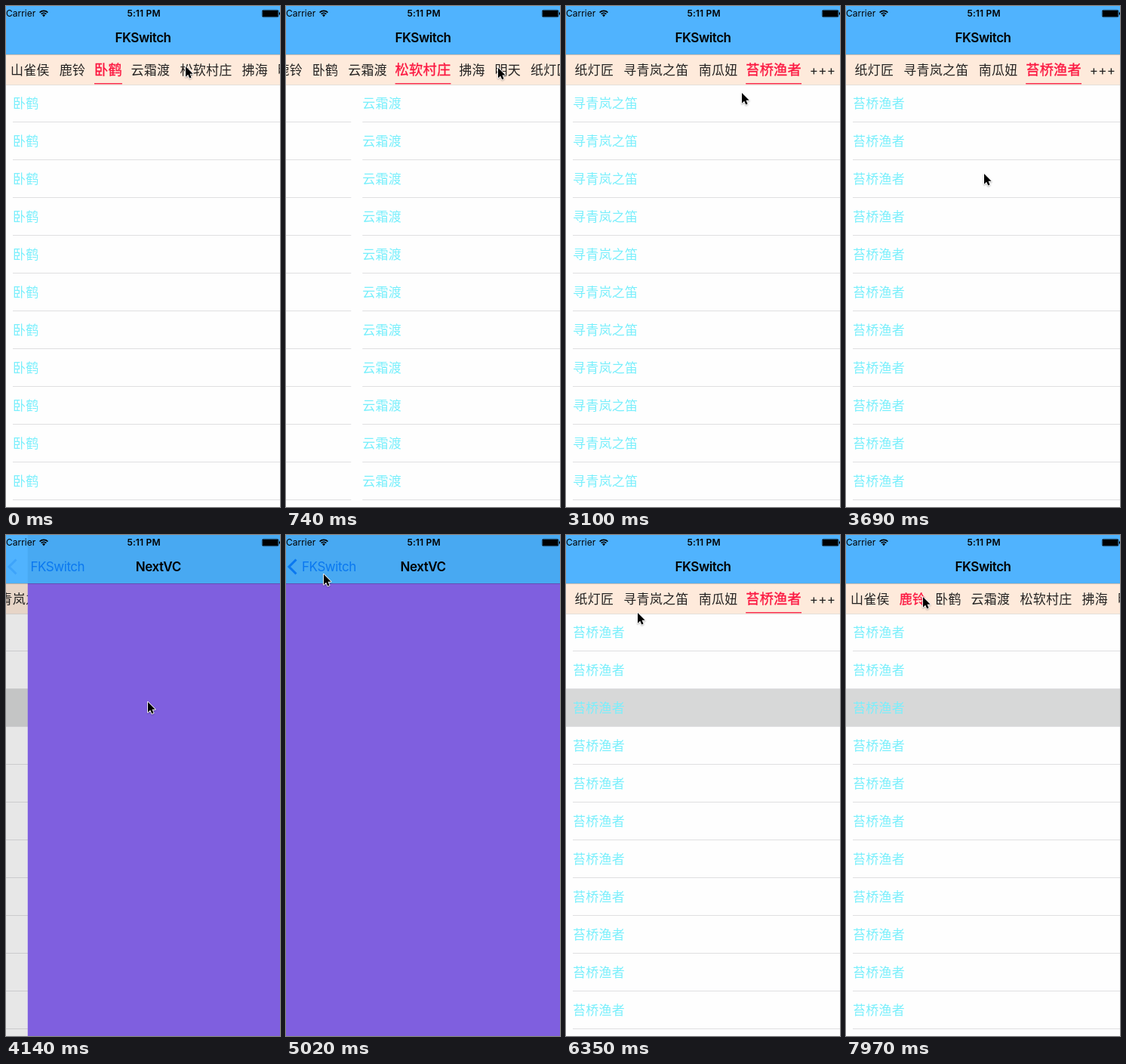
An HTML page with a canvas that plays this animation: 363x663 px, repeating every 8 s.

```html
<!DOCTYPE html>
<html lang="zh-CN">
<head>
<meta charset="utf-8">
<title>FKSwitch</title>
<style>
html, body { margin: 0; width: 100%; height: 100%; overflow: hidden; background: #fff; }
canvas { display: block; width: 363px; height: 663px; }
</style>
</head>
<body>
<canvas id="stage"></canvas>
<script>
const W = 363, H = 663, LOOP = 8000;
const EDGE = -6, PAGE = 375;          // the phone is 375 wide, cropped by 6 on each side
const NAV = 64, LIST = 104, ROW = 50, MAX_SCROLL = 396;
const PUSH = 3892, POP = 5030;
const FAMILY = "Inter, 'Noto Sans CJK SC', 'Noto Sans CJK', sans-serif";

const canvas = document.getElementById('stage');
const ctx = canvas.getContext('2d');
const dpr = window.devicePixelRatio || 1;
canvas.width = W * dpr;
canvas.height = H * dpr;

const clamp = (v, lo = 0, hi = 1) => Math.max(lo, Math.min(hi, v));
const mix = (a, b, k) => a + (b - a) * k;
const smooth = k => k * k * (3 - 2 * k);
const ease = (t, from, to) => smooth(clamp((t - from) / (to - from)));
const spring = s => s <= 0 ? 0 : s > .6 ? 1 : 1 - (1 + 16 * s) * Math.exp(-16 * s);

// Tabs are laid out one after another, each as wide as its text plus a gap.
let right = 6;
const tabs = '山雀侯 鹿铃 卧鹤 云霜渡 松软村庄 拂海 明天 纸灯匠 寻青岚之笛 南瓜妞 苔桥渔者 +++'
  .split(' ').map(name => {
    const n = name === '+++' ? 2 : name.length;
    const width = n * 17.25;
    const tab = { name, width, mid: right + width / 2 };
    right += n * 17.4 + 12.6;
    return tab;
  });
const centred = i => clamp(tabs[i].mid - W / 2, 0, MAX_SCROLL);

const taps = [[-1000, 2], [300, 4], [1000, 6], [1850, 8], [2800, 10], [7960, 1]];
const mousePath = [
  [300, 238, 80], [900, 290, 82], [2050, 290, 82], [2750, 320, 86], [3100, 233, 115],
  [3550, 179, 211], [3690, 183, 222], [4140, 188, 221], [4950, 50, 52],
  [5910, 50, 52], [6350, 95, 103], [6500, 102, 82]
];

// Eases through the tapped tabs; value() gives the goal for each one.
function follow(t, value, delay) {
  return taps.slice(0, 5).reduce(
    (v, [at, i]) => mix(v, value(i), ease(t, at + delay, at + delay + 290)), value(2));
}

// Two drags to the right, the hand going back after each.
const swipes = t => ease(t, 6500, 6850) + ease(t, 7080, 7430);
const returns = t => ease(t, 6850, 7080) + ease(t, 7430, 7750);
const scrollAt = t => follow(t, centred, 0) * (1 - swipes(t) / 2);

function mouseAt(t) {
  const i = mousePath.findIndex(p => p[0] > t);
  const b = mousePath.at(i), a = i > 0 ? mousePath[i - 1] : b;
  const k = a === b ? 0 : ease(t, a[0], b[0]);
  return [mix(a[1], b[1], k) + MAX_SCROLL / 2 * (swipes(t) - returns(t)), mix(a[2], b[2], k)];
}

function box(x, y, w, h, color) {
  ctx.fillStyle = color;
  ctx.fillRect(x, y, w, h);
}

function text(str, x, y, { size = 17, weight = 400, color = '#000', align = 'left', gap = 0, alpha = 1 } = {}) {
  if (alpha <= 0) return;
  ctx.globalAlpha = alpha;
  ctx.font = `${weight} ${size}px ${FAMILY}`;
  ctx.letterSpacing = gap + 'px';
  ctx.textAlign = align;
  ctx.fillStyle = color;
  ctx.fillText(str, x, y);
  ctx.globalAlpha = 1;
}

function drawList(name, x, picked) {
  for (let i = 0; i < 12; i++) {
    const y = LIST + ROW * i;
    const inset = picked && (i === 1 || i === 2) ? EDGE : 9;
    if (picked && i === 2) box(x + EDGE, y, PAGE, ROW - 1, '#d7d8d8');
    box(x + inset, y + ROW - 1, PAGE + EDGE - inset, 1, '#dfdfe1');
    text(name, x + 9, y + 31.3, { color: '#78effc', gap: .25 });
  }
}

function drawPages(t, dx) {
  const pos = follow(t, i => i, 320);
  for (let k = Math.floor(pos); k <= Math.ceil(pos); k++) {
    drawList(tabs[k].name, dx + (k - pos) * PAGE, t >= PUSH);
  }
}

function drawTabs(t, dx) {
  box(dx + EDGE, NAV, PAGE, LIST - NAV, '#feeadb');
  box(dx + EDGE, LIST, PAGE, 1, '#e4dfda');
  const n = taps.findLastIndex(tap => tap[0] <= t);
  const now = taps[n][1], old = taps[Math.max(0, n - 1)][1];
  const k = ease(t, taps[n][0], taps[n][0] + 280);
  const left = dx - scrollAt(t);

  tabs.forEach((tab, i) => {
    const grow = 1 + .07 * (i === now ? k : i === old ? 1 - k : 0);
    const color = i === now ? '#fc1740' : '#242322';
    ctx.save();
    ctx.translate(left + tab.mid, 84.5);
    ctx.scale(grow, grow);
    text(tab.name, -tab.width / 2, 6.4, { color, gap: .25 });
    if (i === now) {
      ctx.strokeStyle = color;
      ctx.lineWidth = .3;
      ctx.strokeText(tab.name, -tab.width / 2, 6.4);
    }
    ctx.restore();
  });

  const w = mix(tabs[old].width, tabs[now].width, k) * 1.07;
  const mid = left + mix(tabs[old].mid, tabs[now].mid, k);
  box(mid - w / 2, 102, w, 1.4, '#f8274b');
}

function drawStatus() {
  text('Carrier', 0, 14.3, { size: 12 });
  text('5:11 PM', 182.5, 14.3, { size: 12, weight: 600, align: 'center', gap: .15 });
  const fan = r => {
    ctx.beginPath();
    ctx.arc(50, 14, r, -Math.PI * .75, -Math.PI * .25);
  };
  ctx.strokeStyle = ctx.fillStyle = '#000';
  ctx.lineWidth = 1.7;
  for (const r of [4.7, 7.6]) {
    fan(r);
    ctx.stroke();
  }
  fan(2.8);
  ctx.lineTo(50, 14.6);
  ctx.fill();

  ctx.lineWidth = .6;
  ctx.beginPath();
  ctx.roundRect(339.3, 5.3, 21.8, 9.4, 2);
  ctx.stroke();
  box(340, 6, 20.4, 8, '#000');
  box(361.8, 8.5, 1.2, 3, '#000');
}

function drawNav(t, p, edge) {
  box(0, 0, W, NAV, '#50b3fe');
  if (p > 0) box(Math.max(0, edge), 0, W, NAV, '#48a9f2');
  const going = t < POP;
  const s = (t - (going ? PUSH : POP)) / 1000;
  const gone = 1 - s / .15;
  const home = going ? gone : (s - .2) / .27;
  const back = going ? s / .2 : gone;
  const next = going ? s / .2 : 1 - s / .31;
  const arrow = going ? (s - .2) / .2 : gone;
  const bold = { weight: 600, align: 'center', gap: -.45 };

  text('FKSwitch', 181.5 - 113 * p, 48, { ...bold, alpha: clamp(home) });
  text('FKSwitch', 144 - 123 * p, 48, { color: '#0a78f0', gap: -.45, alpha: clamp(back) });
  text('NextVC', 181.5 + 218 * (1 - p), 48, { ...bold, alpha: clamp(next) });

  ctx.globalAlpha = clamp(arrow);
  ctx.strokeStyle = '#0a78f0';
  ctx.lineWidth = 3;
  ctx.beginPath();
  ctx.moveTo(13.5, 32.5);
  ctx.lineTo(4, 42);
  ctx.lineTo(13.5, 51.5);
  ctx.stroke();
  ctx.globalAlpha = 1;

  drawStatus();
  box(0, NAV, W, 1, 'rgba(0,0,0,.2)');
}

function drawMouse([x, y]) {
  ctx.save();
  ctx.translate(x, y);
  ctx.scale(.88, .88);
  ctx.beginPath();
  [[0, 0], [0, 15.5], [3.6, 12.2], [6, 17.6], [8.6, 16.5], [6.3, 11.2], [11, 11.2]]
    .forEach(([a, b]) => ctx.lineTo(a, b));
  ctx.closePath();
  ctx.shadowColor = 'rgba(0,0,0,.3)';
  ctx.shadowBlur = 2 * dpr;
  ctx.shadowOffsetY = dpr;
  ctx.lineJoin = 'round';
  ctx.lineWidth = 2;
  ctx.strokeStyle = '#fff';
  ctx.stroke();
  ctx.shadowColor = 'transparent';
  ctx.fillStyle = '#000';
  ctx.fill();
  ctx.restore();
}

function draw(t) {
  ctx.setTransform(dpr, 0, 0, dpr, 0, 0);
  box(0, 0, W, H, '#fefefe');
  const p = spring((t - PUSH) / 1000) - spring((t - POP) / 1000);
  const edge = EDGE + PAGE * (1 - p);
  const dx = -.3 * PAGE * p;
  drawPages(t, dx);
  drawTabs(t, dx);
  if (p > 0) {
    box(0, NAV, W, H - NAV, `rgba(0,0,0,${.1 * p})`);
    box(edge, NAV, PAGE, H - NAV, '#7f5fdf');
  }
  drawNav(t, p, edge);
  drawMouse(mouseAt(t));
}

const start = performance.now();
function tick() {
  draw((performance.now() - start) % LOOP);
  requestAnimationFrame(tick);
}
tick();
</script>
</body>
</html>
```
